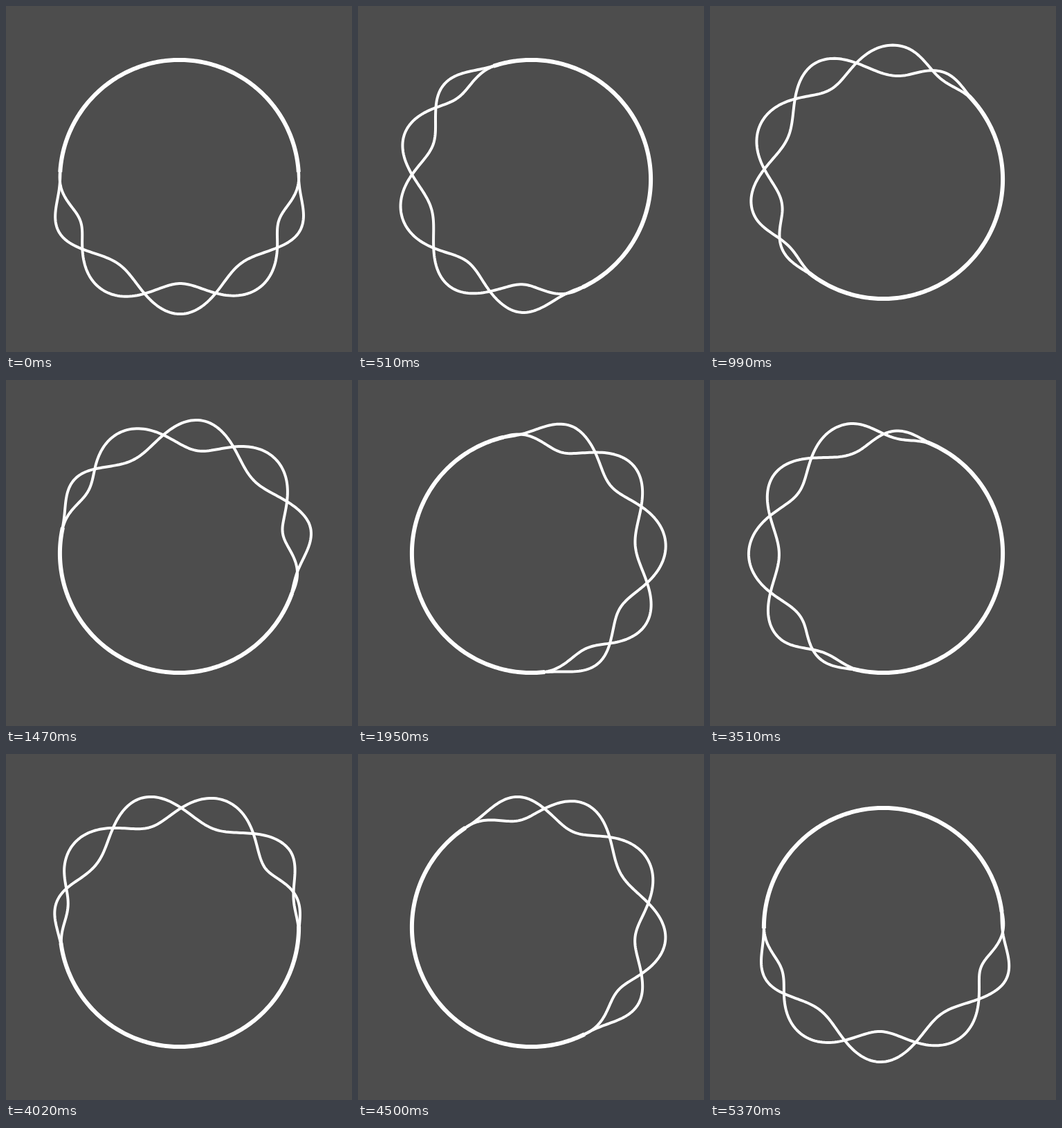
Recreate the animation shown at these times as an HTML page. Size 500x500 px, loop 5.4 s.

```html
<!DOCTYPE html>
<html lang="en">
<head>
<meta charset="utf-8">
<title>Braided ring</title>
<style>
  html, body { margin: 0; width: 100%; height: 100%; overflow: hidden; background: #4d4d4d; }
  svg { display: block; width: 100%; height: 100%; }
  path { fill: none; stroke: #fff; stroke-linejoin: round; }
  .strand { stroke-width: 4; }
  .ring { stroke-width: 6; }
  g { filter: blur(.6px); }
</style>
</head>
<body>
<svg viewBox="0 0 500 500">
  <g>
    <path class="ring" id="ring"/>
    <path class="strand" id="strandA"/>
    <path class="strand" id="strandB"/>
  </g>
</svg>
<script>
const LOOP = 5400, STEP = 30;
const CENTER = 250.5, RADIUS = 172.6, AMPLITUDE = 22, WAVES = 5;
const FADE_START = 58, FADE_END = 98, MERGE = 93.5;

const rad = deg => deg * Math.PI / 180;
const [ring, strandA, strandB] = ['ring', 'strandA', 'strandB'].map(id => document.getElementById(id));

// Angles are in degrees, clockwise from the bottom of the ring.
function point(angle, radius) {
  const x = CENTER - radius * Math.sin(rad(angle));
  const y = CENTER + radius * Math.cos(rad(angle));
  return x.toFixed(2) + ' ' + y.toFixed(2);
}

function curve(from, to, radiusAt) {
  const points = [];
  for (let angle = from; angle <= to; angle++) points.push(point(angle, radiusAt(angle)));
  return 'M' + points.join('L');
}

function envelope(distance) {
  const k = Math.min(1, Math.max(0, (FADE_END - distance) / (FADE_END - FADE_START)));
  return k * k * (3 - 2 * k);
}

function render(time) {
  const turn = Math.floor((time % LOOP) / STEP) * STEP / LOOP * 360;
  const center = 2 * turn;
  const phase = -turn - 0.4;

  const offset = angle => {
    const u = rad(WAVES * (angle - phase));
    const wave = Math.cos(u) - 0.06 * Math.sin(u) ** 2;
    return AMPLITUDE * envelope(Math.abs(angle - center)) * wave;
  };

  const from = center - FADE_END, to = center + FADE_END;
  strandA.setAttribute('d', curve(from, to, angle => RADIUS + offset(angle)));
  strandB.setAttribute('d', curve(from, to, angle => RADIUS - offset(angle)));
  ring.setAttribute('d', curve(center + MERGE, center + 360 - MERGE, () => RADIUS));
}

const start = performance.now();
function tick() {
  render(performance.now() - start);
  requestAnimationFrame(tick);
}
tick();
</script>
</body>
</html>
```
